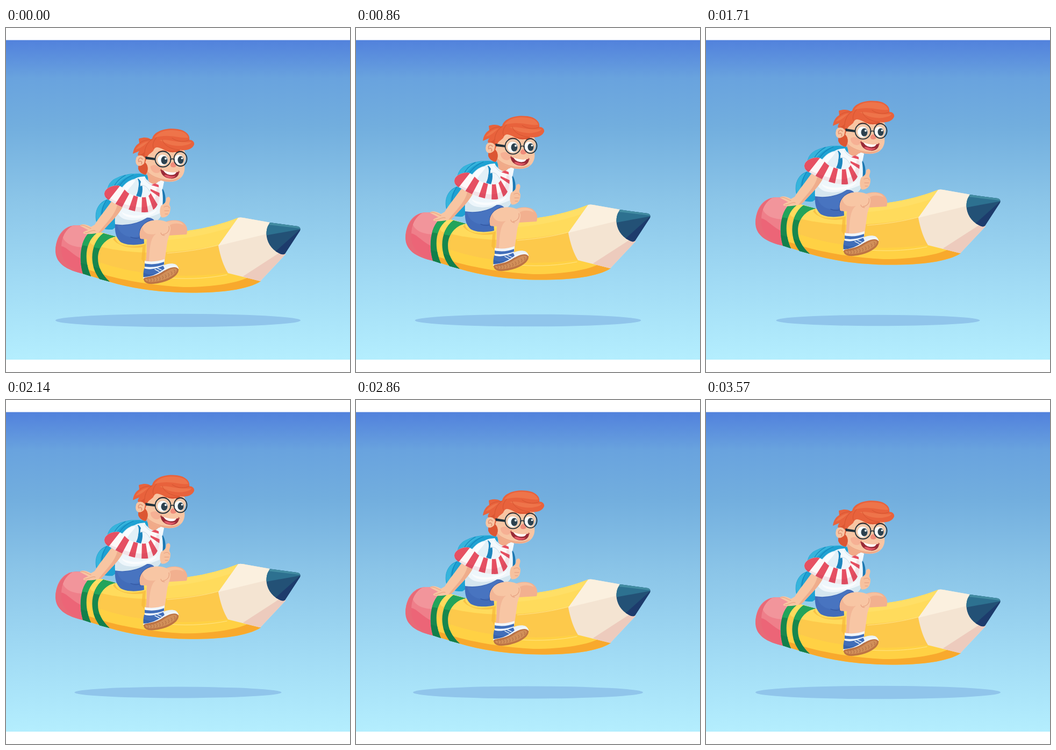
Recreate the animation shown at these times as an HTML page. Size 640 px wide and 640 px high, loop 3.64 s.

```html
<!DOCTYPE html>
<html lang="en">
<head>
<meta charset="utf-8">
<title>Flying pencil</title>
<style>
  html, body { margin: 0; width: 100%; height: 100%; overflow: hidden; background: #fff; }
  svg { display: block; width: 100%; height: 100%; }
  .line { fill: none; stroke-linecap: round; stroke-linejoin: round; }
</style>
</head>
<body>
<svg viewBox="0 0 640 640">
  <defs>
    <linearGradient id="sky" x1="0" y1="0" x2="0" y2="1">
      <stop offset="0" stop-color="#5282dc"/>
      <stop offset=".04" stop-color="#598cdd"/>
      <stop offset=".12" stop-color="#69a3de"/>
      <stop offset=".27" stop-color="#72aede"/>
      <stop offset=".5" stop-color="#8bc5e8"/>
      <stop offset=".75" stop-color="#a0daf4"/>
      <stop offset="1" stop-color="#b4eefe"/>
    </linearGradient>
    <clipPath id="bodyClip"><path d="M158 379C178 378 195 386 210 390C250 396 300 387 340 377C375 372 404 364 432 353L444 353L474 471C450 487 400 492.500 345 492.500C285 492 235 485 192 472L143 457C135 425 143 395 158 379Z"/></clipPath>
    <clipPath id="eraserClip"><path d="M146 458C112 450 92 438 92 414C93 388 106 367 132 367C150 367 164 374 174 382Z"/></clipPath>
    <clipPath id="woodClip"><path d="M432 353Q436 352 441 353L492 362L520 421L473 471L413 456Q401 437 395 405Z"/></clipPath>
    <clipPath id="leadClip"><path d="M491 362L543 369Q549 371 547 377L519 420Q515 423 508 419C488 409 480 387 487 369Z"/></clipPath>
    <clipPath id="tieClip"><path d="M207 293C217 293 221 303 229 308C244 315 262 319 268 309C271 303 266 298 271 292L277 289L284 292C284 299 287 303 285 316C284 332 274 343 258 343C236 343 210 332 193 321C185 317 181 311 184 304C188 297 197 293 207 293Z"/></clipPath>
    <clipPath id="bandClip"><path d="M154 381L168 382C148 398 144 430 158 462L143 457C135 429 138 398 154 381ZM181 382L204 388C170 394 156 440 193 472L174 467C153 440 157 400 181 382Z"/></clipPath>
    <clipPath id="shoeClip"><path d="M256 467C256 462 270 465 289 455C302 446 317 441 321 449C322 459 306 470 287 474C270 478 257 477 256 467Z"/></clipPath>
    <clipPath id="hairClip"><path id="hairShape" d="M272 206C275 192 297 185 319 188C334 190 343 199 341 208C347 208 351 212 350 217C347 225 336 229 324 227C318 232 306 233 295 227C285 222 279 219 275 226C274 232 264 233 262 242L259 250C266 257 264 268 260 273C253 272 247 267 246 261L248 238C243 237 246 232 248 229L236 234C237 225 241 218 248 214L247 206C254 203 264 203 269 207Z"/></clipPath>
  </defs>

  <rect y="22.500" width="640" height="594.500" fill="url(#sky)"/>
  <ellipse id="shadow" cx="320" cy="544" rx="228" ry="12.300" fill="#90c5eb"/>

  <g id="rider">
    <!-- backpack -->
    <path fill="#1fa2d3" d="M266 275C246 267 220 272 208 278C193 283 185 296 188 319C172 324 165 340 167 355C168 370 181 376 198 375L240 345Z"/>
    <path fill="#36b4dc" d="M251 271C229 271 204 285 197 311L190 312C186 296 194 283 208 278C222 273 238 270 251 271ZM187 321C176 332 173 348 178 367C169 363 166 353 168 343C170 332 177 324 187 321Z"/>
    <g class="line" stroke="#1583b9" stroke-width="1.200">
      <path d="M222 274C206 283 198 294 197 313M237 273C222 279 211 289 206 305M187 320C178 333 176 350 182 370"/>
    </g>

    <!-- pencil -->
    <g clip-path="url(#eraserClip)">
      <path fill="#ec6577" d="M85 360H180V465H85Z"/>
      <path fill="#ef7f8a" d="M92 413C107 391 121 428 150 432L180 380L130 362L92 380Z"/>
      <path fill="#f2959b" d="M104 380C104 398 120 409 150 408L180 380L130 362Z"/>
      <path fill="#e86a78" d="M91 414C94 390 106 371 124 368C108 376 100 396 104 421C106 435 119 447 140 456L110 452Z"/>
    </g>
    <g clip-path="url(#bodyClip)">
      <path fill="#ffd144" d="M130 340H490V500H130Z"/>
      <path fill="#fdc94b" d="M130 390L172 405C240 425 320 421 410 400L430 453C350 466 250 465 160 431Z"/>
      <path fill="#ffdb5c" d="M130 370L445 345L410 401C320 421 240 425 160 403Z"/>
      <path fill="#ffdf66" d="M160 373L445 345L420 370C350 394 250 406 160 388Z"/>
      <path fill="#f8a92d" d="M130 440C175 461 250 478 330 482C390 482 432 474 455 462L490 471V500H130Z"/>
      <g class="line" stroke="#ffe589" stroke-width="1">
        <path d="M300 419C338 416 370 411 398 403M305 465C345 468 380 465 411 459"/>
      </g>
      <path fill="#f7b83a" opacity=".7" d="M203 389C205 407 235 410 260 402L258 438L252 430L254 408C229 411 208 405 199 393Z"/>
    </g>
    <g clip-path="url(#bandClip)">
      <path fill="#17874e" d="M130 370H215V480H130Z"/>
      <path fill="#22a45b" d="M130 370H215L196 414L130 402Z"/>
      <path fill="#117f4b" d="M130 434L200 455V480H130Z"/>
    </g>
    <g clip-path="url(#woodClip)">
      <path fill="#f4e4d2" d="M390 345H525V475H390Z"/>
      <path fill="#fbf0df" d="M390 345H500L490 382L395 405Z"/>
      <path fill="#edcbbd" d="M441 462L512 416L530 420L473 480Z"/>
    </g>
    <g clip-path="url(#leadClip)">
      <path fill="#235176" d="M480 355H552V425H480Z"/>
      <path fill="#2d7190" d="M480 355H552L549 374L483 386Z"/>
      <path fill="#428ca2" d="M489 366L548 373L552 365L491 358Z"/>
      <path fill="#1d3b6c" d="M501 416L548 374L552 390L519 428Z"/>
    </g>

    <!-- far leg and hand -->
    <path fill="#f2b08f" d="M294 362C305 356 325 355 333 365C338 371 338 378 336 384L303 386Z"/>
    <path fill="#f7c19f" d="M298 361C310 357 325 357 331 367C321 362 309 363 303 368Z"/>
    <path fill="#1b78b2" d="M285 291C295 300 298 313 296 326L288 332Z"/>

    <!-- shirt -->
    <path fill="#f1aa88" d="M260 263L292 280L288 293L268 293Z"/>
    <path fill="#eef6fb" d="M249 277C228 281 214 306 207 335C202 351 201 366 206 373L270 362C281 359 289 354 288 346C293 329 293 311 289 294L294 287C287 282 282 286 278 291C271 291 261 284 258 276Z"/>
    <path fill="#d5e6ef" d="M206 341C212 360 239 365 288 344C289 355 280 360 270 364L206 374C202 366 203 353 206 341Z"/>
    <path fill="#fff" d="M215 342C231 353 262 350 281 337C276 354 222 361 215 342Z" opacity=".7"/>
    <path fill="#1d86be" d="M246 280C255 287 256 302 251 315L242 312C248 300 247 290 240 284Z"/>
    <path fill="#e2f0f7" d="M245 281C235 279 222 287 214 299L221 314L240 312C247 301 249 288 245 281Z"/>
    <path fill="#f8fcff" d="M241 283C231 282 221 290 216 300L224 306C230 296 237 291 241 283Z"/>
    <path fill="#f3f9fd" d="M258 276C253 281 249 288 250 294C257 290 265 298 267 304L274 292C268 291 262 285 258 276ZM279 291L290 282L294 286L291 301L284 293Z"/>
    <path class="line" stroke="#cbdde8" stroke-width="1" d="M250 294C257 290 264 297 267 304L273 293M258 280C262 288 269 292 275 292"/>
    <path fill="#f7c19e" d="M289 352C285 345 286 335 289 330C294 327 297 325 298 320C297 315 303 312 305 316C307 321 303 325 304 329C307 333 306 340 304 345C301 350 295 354 289 352Z"/>
    <path class="line" stroke="#e49a7b" stroke-width="1" d="M294 333C299 330 303 331 304 335M295 340H303M296 346H301"/>

    <!-- arm -->
    <path fill="#f8c5a2" d="M196 323L217 333C208 349 196 360 184 373L177 380C168 382 159 384 147 383C141 382 143 379 153 376L138 368C137 364 150 364 158 370L165 366C174 351 185 339 196 323Z"/>
    <path fill="#efad8c" d="M207 329L217 333C208 349 196 360 184 373L177 380L172 381C184 365 204 347 207 329Z"/>
    <path class="line" stroke="#e59c7c" stroke-width="1" d="M139 367C147 366 151 371 158 373M147 381C155 381 160 375 166 377"/>

    <!-- striped tie -->
    <g clip-path="url(#tieClip)">
      <path fill="#fdf8f8" d="M178 285H292V348H178Z"/>
      <path id="stripes" fill="#e65062"/>
      <path fill="#8f2b54" opacity=".1" d="M181 310C205 325 245 338 263 332C276 327 280 315 280 298L290 298V350H181Z"/>
    </g>

    <!-- shorts and near leg -->
    <path fill="#426cb9" d="M203 365C225 369 249 362 262 353C270 352 276 356 277 361L256 383L257 401C241 405 222 404 213 398C204 390 202 377 203 365Z"/>
    <path fill="#4874c0" d="M207 367C228 370 249 363 263 354L271 357C255 364 247 374 248 387C231 393 211 386 207 367Z"/>
    <path class="line" stroke="#3156a0" stroke-width="1.200" d="M250 394C245 378 251 366 268 358M232 389C239 392 244 392 249 390"/>
    <path fill="#f8c6a4" d="M250 392C245 374 257 360 273 358C289 355 305 360 306 371C307 379 302 388 300 399L295 435C283 440 268 439 260 434C263 419 261 405 262 393Z"/>
    <path fill="#f2b696" d="M250 392C247 383 249 375 254 369C255 381 264 386 279 383C267 391 267 417 266 437L260 434C263 419 261 405 262 393Z"/>
    <path class="line" stroke="#e6a080" stroke-width="1.200" d="M303 369C305 376 301 383 292 384M288 381C289 385 292 386 295 386"/>

    <!-- sock and shoe -->
    <path fill="#f1f7fc" d="M258 433C270 436 284 434 295 430L293 451L258 453Z"/>
    <path fill="#416eb9" d="M258 438C271 441 284 439 294 435V440C283 444 271 446 258 444Z"/>
    <path fill="#416eb9" d="M257 447C268 451 282 447 293 442C296 441 304 439 311 440L292 460L257 468C254 460 256 453 257 447Z"/>
    <path fill="#3762ab" d="M256 455C266 461 279 458 289 454L288 462L257 468Z"/>
    <path fill="#e9f2f9" d="M292 442C303 437 317 436 320 445L294 457C296 450 295 446 292 442Z"/>
    <path class="line" stroke="#e9f2f9" stroke-width="1.500" d="M277 449L285 453M282 447L289 450"/>
    <path class="line" stroke="#f4f8fb" stroke-width="2.500" d="M256 465C270 464 282 459 291 452C302 444 316 439 320 447"/>
    <g clip-path="url(#shoeClip)">
      <path fill="#bd7444" d="M250 435H325V480H250Z"/>
      <path fill="#d18f59" d="M259 467C272 467 284 463 295 455C307 447 317 445 318 450C317 459 300 468 283 471C268 474 260 473 259 467Z"/>
      <path id="tread" class="line" stroke="#ae6b42" stroke-width="1"/>
    </g>

    <!-- head -->
    <path fill="#f8c5a3" d="M260 224C278 210 313 211 328 222C335 232 337 241 331 252C335 265 330 279 317 284C304 289 288 285 275 278C266 274 258 265 257 253C247 261 240 253 242 243C244 235 254 236 258 243Z"/>
    <path fill="#efaa89" d="M257 253C260 270 276 278 293 281C305 284 316 282 325 277C316 289 295 288 277 279C265 274 256 265 257 253Z"/>
    <path fill="#f39c85" opacity=".5" d="M269 257C279 251 292 259 287 267C280 274 268 267 269 257Z"/>

    <use href="#hairShape" fill="#e8623c"/>
    <g clip-path="url(#hairClip)">
      <path fill="#dc5633" d="M244 240L258 231L259 250L267 260L258 276L243 266ZM276 226C284 219 296 232 324 227L318 235H278Z"/>
      <path fill="#ee744a" d="M276 204C284 191 303 188 319 191C332 192 338 199 339 204C320 206 305 196 276 204ZM285 209C302 205 315 215 345 212C345 216 329 222 309 218C298 216 292 210 285 209ZM241 226C247 217 257 212 265 211C259 216 252 224 241 226Z"/>
      <path class="line" stroke="#d25430" stroke-width="1" d="M272 207C264 212 258 222 258 232M280 204C272 212 272 222 276 226M309 205C320 213 334 212 341 208M291 208C293 218 307 226 323 227M249 214C255 209 264 207 270 208"/>
    </g>
    <path fill="#f8c5a3" d="M257 252C247 262 239 254 242 244C244 235 255 235 259 243Z"/>
    <path class="line" stroke="#df9273" stroke-width="1.500" d="M254 244C249 239 245 244 247 249C250 246 254 249 252 253"/>

    <!-- eyes and glasses -->
    <g fill="#fff">
      <ellipse cx="291.500" cy="245.500" rx="9.500" ry="10"/>
      <ellipse cx="322" cy="245" rx="8.500" ry="9.500"/>
    </g>
    <g fill="#182b38">
      <ellipse cx="294.500" cy="246" rx="6" ry="7.500"/>
      <ellipse cx="325" cy="245.500" rx="5.500" ry="7.200"/>
    </g>
    <g fill="#fff">
      <circle cx="297" cy="243" r="2"/><circle cx="327.500" cy="242.500" r="1.800"/>
    </g>
    <path class="line" stroke="#c74e2d" stroke-width="2" d="M284 231C288 228 294 228 298 230M317 231C321 228 326 228 329 231"/>
    <path fill="#f08d7b" d="M306 254C307 249 314 248 317 252C319 257 314 260 310 259C307 259 306 257 306 254Z"/>
    <g class="line" stroke="#20313b" stroke-width="1.800">
      <circle cx="292" cy="244" r="14.500" fill="#c9ecf8" fill-opacity=".12"/>
      <ellipse cx="324.500" cy="243.500" rx="12" ry="13.500" fill="#c9ecf8" fill-opacity=".12"/>
      <path d="M306 245C308 243 311 243 313 245"/>
    </g>
    <path fill="#20313b" d="M259 239L278 242V246L260 244Z"/>

    <!-- mouth -->
    <path fill="#992b37" d="M288 263C299 270 312 271 322 267C322 276 315 281 305 280C295 279 287 272 288 263Z"/>
    <path fill="#fff" d="M293 265C300 268 311 270 317 268C315 273 310 274 304 273C299 272 295 269 293 265Z"/>
    <path fill="#e45a67" d="M294 274C299 271 304 278 316 275C311 281 300 281 294 274Z"/>
    <path class="line" stroke="#c66151" stroke-width="1.200" d="M287 265L289 262M321 266L323 268"/>
  </g>
</svg>
<script>
  const $ = id => document.getElementById(id);

  // Each stripe: upper left, upper right, lower right, lower left.
  const stripes = [
    [180, 288, 215, 290, 189, 323, 178, 318],
    [221, 300, 230, 307, 215, 335, 203, 328],
    [238, 310, 246, 312, 239, 345, 227, 341],
    [253, 314, 260, 314, 265, 346, 252, 348],
    [265, 312, 269, 307, 284, 332, 275, 341],
    [269, 303, 268, 299, 288, 308, 288, 316],
    [266, 291, 275, 287, 286, 291, 286, 297]
  ];
  $('stripes').setAttribute('d', stripes.map(s => `M${s.join(' ')}Z`).join(''));

  let tread = '';
  for (let i = 0; i < 10; i++) {
    const x = 263 + i * 5.5, y = 469 - i * i * .2;
    tread += `M${x} ${y - 3}l2 3l-1 3`;
  }
  $('tread').setAttribute('d', tread);

  const LOOP = 3640, RATE = 14 / 1000, PEAK = 25.5, END = 50;
  const RISE = 52.4, SHRINK = .17;
  const ease = x => x * x * (3 - 2 * x);

  function draw(time) {
    const step = Math.floor((time % LOOP + 5) * RATE);
    const lift = step < PEAK
      ? ease(step / PEAK)
      : ease(Math.max(0, END - step) / (END - PEAK));
    const size = 1 - SHRINK * lift;
    $('rider').setAttribute('transform', `translate(0 ${-RISE * lift})`);
    $('shadow').setAttribute('rx', 228 * size);
    $('shadow').setAttribute('ry', 12.3 * size);
  }

  const start = performance.now();
  function tick() {
    draw(performance.now() - start);
    requestAnimationFrame(tick);
  }
  tick();
</script>
</body>
</html>
```
